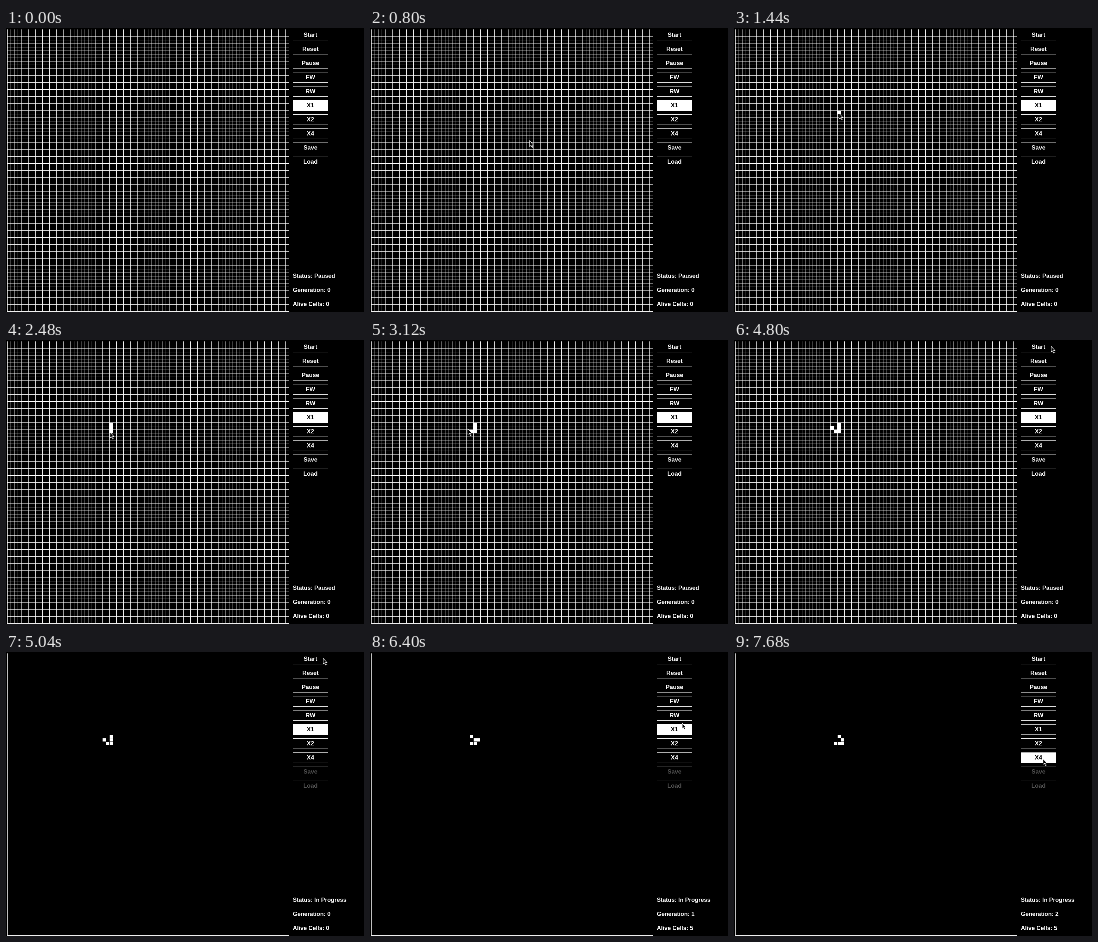
An HTML page with a canvas for the animation above (8 s loop, 358x284 px).

```html
<!DOCTYPE html>
<html lang="en">
<head>
<meta charset="utf-8">
<title>Game of Life</title>
<style>
  html, body { margin: 0; width: 100%; height: 100%; overflow: hidden; background: #000; }
  canvas { display: block; width: 358px; height: 284px; }
</style>
</head>
<body>
<canvas id="stage" width="358" height="284"></canvas>
<script>
const stage = document.getElementById('stage').getContext('2d');
stage.imageSmoothingQuality = 'low';

// The scene is drawn at full layout size, then sampled down to the stage.
const scene = document.createElement('canvas');
scene.width = 1016;
scene.height = 806;
const ctx = scene.getContext('2d');

const LOOP = 8000, TICK = 80;
const START = 5040, FIRST_GENERATION = 5840, GENERATION_TIME = 1120, FAST = 7680;
const FIRST_CLICK = 1280, CLICK_TIME = 480;
const LEFT = 3, TOP = 4, CELL = 10, CELLS = 80;
const LABELS = ['Start', 'Reset', 'Pause', 'FW', 'RW', 'X1', 'X2', 'X4', 'Save', 'Load'];

// Glider cells in the order they are clicked
const GLIDER = [[2, 0], [2, 1], [2, 2], [1, 2], [0, 1]].map(([x, y]) => [x + 27, y + 23]);

const cellX = col => LEFT + col * CELL;
const cellY = row => TOP + row * CELL;
const buttonY = label => 20 + 40 * LABELS.indexOf(label);
const clickTime = n => FIRST_CLICK + n * CLICK_TIME;

const MOVES = [
  ...GLIDER.map(([col, row], n) => ({
    from: n ? clickTime(n) - 320 : TICK,
    to: clickTime(n) - TICK,
    x: cellX(col) + 5,
    y: cellY(row) + 8
  })),
  { from: 3520, to: 4320, x: 900, y: buttonY('X1') - 18 },
  { from: 4400, to: 4800, x: 900, y: buttonY('Start') - 2 },
  { from: 5600, to: 6400, x: 886, y: buttonY('X1') - 18 },
  { from: 6480, to: 6960, x: 877, y: buttonY('X4') + 3 }
];

function box(x, y, width, height, color = '#fff') {
  ctx.fillStyle = color;
  ctx.fillRect(x, y, width, height);
}

function text(label, x, y, size, color, align) {
  ctx.font = `bold ${size}px "Liberation Sans", sans-serif`;
  ctx.textAlign = align;
  ctx.fillStyle = color;
  ctx.fillText(label, x, y);
}

function drawBoard(showGrid, cells) {
  const size = CELL * CELLS;
  box(LEFT + 1, TOP, 1, size);
  box(LEFT, TOP + size, size + 1, 1);
  if (showGrid) {
    for (let n = 1; n < CELLS; n++) {
      box(cellX(n), TOP, 1, size);
      box(LEFT, cellY(n), size, 1);
    }
  }
  for (const [col, row] of cells) box(cellX(col) + 1, cellY(row) + 1, CELL - 1, CELL - 1);
}

function drawButton(label, selected, disabled) {
  const y = buttonY(label), color = disabled ? '#555' : '#fff';
  box(814, y - 15, 100, 30, color);
  if (!selected) box(815, y - 14, 98, 28, '#000');
  text(label, 864, y + 5, 17, selected ? '#000' : color, 'center');
}

function nextGeneration(cells) {
  const counts = new Map(), alive = new Set(cells.map(String));
  for (const [x, y] of cells)
    for (let dx = -1; dx <= 1; dx++)
      for (let dy = -1; dy <= 1; dy++)
        if (dx || dy) {
          const key = `${x + dx},${y + dy}`;
          counts.set(key, (counts.get(key) || 0) + 1);
        }
  return [...counts]
    .filter(([key, n]) => n === 3 || (n === 2 && alive.has(key)))
    .map(([key]) => key.split(',').map(Number));
}

function drawPointer(t) {
  if (t < TICK) return;
  let x = 830, y = 510;
  for (const move of MOVES) {
    const p = Math.min(1, Math.max(0, (t - move.from) / (move.to - move.from)));
    const eased = p * p * (3 - 2 * p);
    x += (move.x - x) * eased;
    y += (move.y - y) * eased;
  }
  ctx.save();
  ctx.translate(x, y);
  ctx.fillStyle = '#000';
  ctx.strokeStyle = '#fff';
  ctx.lineWidth = 1.5;
  ctx.fill(ARROW);
  ctx.stroke(ARROW);
  ctx.restore();
}
const ARROW = new Path2D('M0 0V16L4 13L7 19L9 18L7 12H11Z');

function draw(t) {
  const running = t >= START;
  const generation = Math.max(0, Math.floor((t - FIRST_GENERATION) / GENERATION_TIME) + 1);
  let cells = GLIDER.filter((cell, n) => t >= clickTime(n));
  for (let g = 0; g < generation; g++) cells = nextGeneration(cells);

  box(0, 0, scene.width, scene.height, '#000');
  drawBoard(!running, cells);

  const speed = t >= FAST ? 'X4' : 'X1';
  for (const label of LABELS)
    drawButton(label, label === speed, running && (label === 'Save' || label === 'Load'));

  const status = [
    `Status: ${running ? 'In Progress' : 'Paused'}`,
    `Generation: ${generation}`,
    `Alive Cells: ${generation ? cells.length : 0}`
  ];
  status.forEach((line, n) => text(line, 814, 709 + 40 * n, 16.6, '#fff', 'left'));
  drawPointer(t);
  stage.drawImage(scene, 0, 0, 358, 284);
}

const begin = performance.now();
function frame() {
  const t = Math.max(0, performance.now() - begin) % LOOP;
  draw(Math.floor(t / TICK) * TICK);
  requestAnimationFrame(frame);
}
frame();
</script>
</body>
</html>
```
